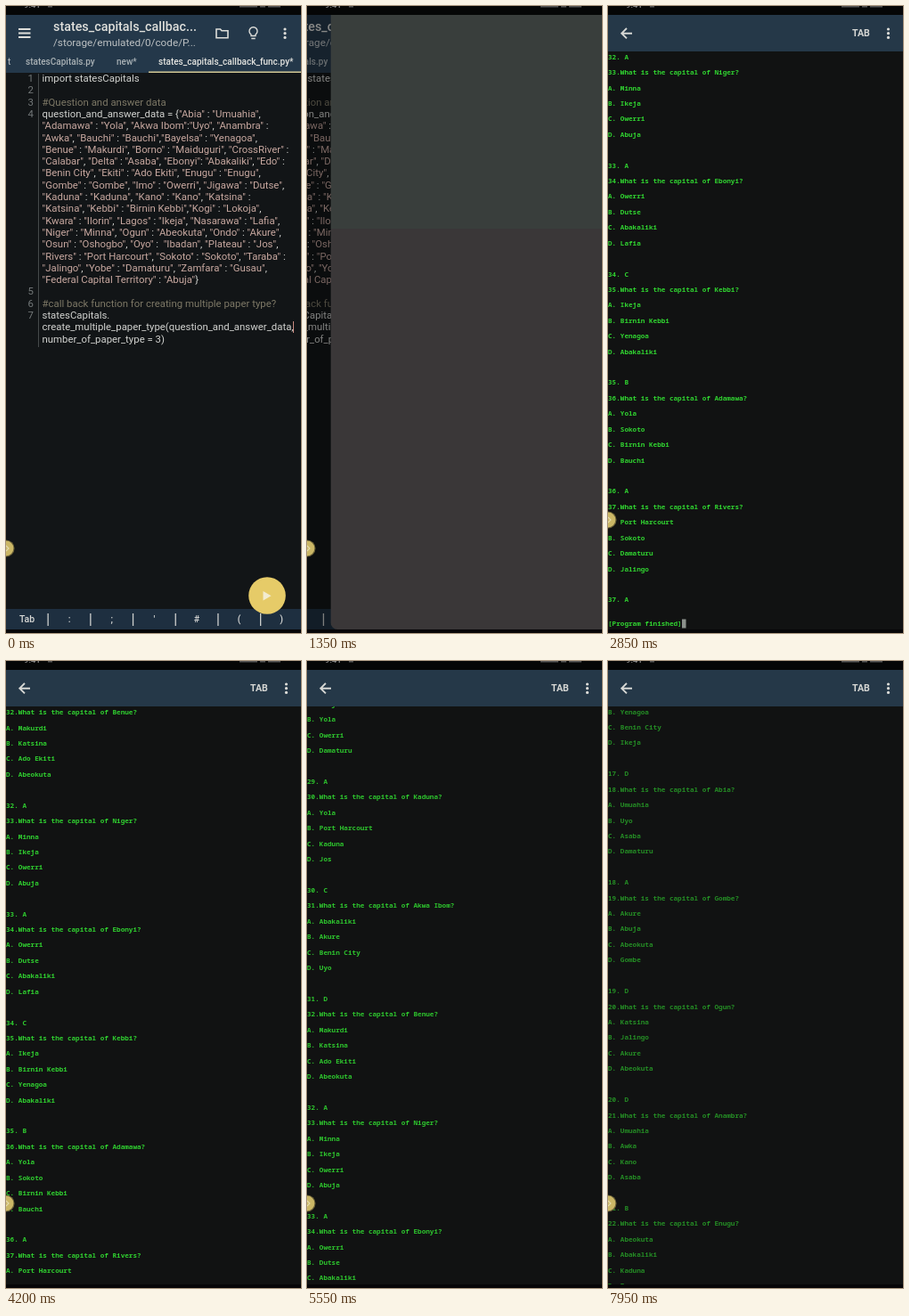
An HTML page with a canvas for the animation above (8 s loop, 331 by 704 pixels).

```html
<!DOCTYPE html>
<html>
<head>
<meta charset="utf-8">
<style>
html, body { margin: 0; width: 100%; height: 100%; overflow: hidden; background: #000; }
canvas { display: block; width: 331px; height: 704px; }
</style>
</head>
<body>
<canvas id="stage" width="331" height="704"></canvas>
<script>
const ctx = document.getElementById('stage').getContext('2d');
const W = 331, H = 704, LOOP = 8000, STEP = 150;
const ROW = 17.42, BLOCK = ROW * 7;
const SANS = 'Roboto, sans-serif', MONO = '"Noto Sans Mono", monospace';

// A leading number starts a numbered line; the rest are wrapped lines.
const code = `1|import statesCapitals
2|
3|#Question and answer data
4|question_and_answer_data = {"Abia" : "Umuahia",
|"Adamawa" : "Yola", "Akwa Ibom":"Uyo", "Anambra" :
|"Awka", "Bauchi" : "Bauchi","Bayelsa" : "Yenagoa",
|"Benue" : "Makurdi", "Borno" : "Maiduguri", "CrossRiver" :
|"Calabar", "Delta" : "Asaba", "Ebonyi": "Abakaliki", "Edo" :
|"Benin City", "Ekiti" : "Ado Ekiti", "Enugu" : "Enugu",
|"Gombe" : "Gombe", "Imo" : "Owerri", "Jigawa" : "Dutse",
|"Kaduna" : "Kaduna", "Kano" : "Kano", "Katsina" :
|"Katsina", "Kebbi" : "Birnin Kebbi","Kogi" : "Lokoja",
|"Kwara" : "Ilorin", "Lagos" : "Ikeja", "Nasarawa" : "Lafia",
|"Niger" : "Minna", "Ogun" : "Abeokuta", "Ondo" : "Akure",
|"Osun" : "Oshogbo", "Oyo" :  "Ibadan", "Plateau" : "Jos",
|"Rivers" : "Port Harcourt", "Sokoto" : "Sokoto", "Taraba" :
|"Jalingo", "Yobe" : "Damaturu", "Zamfara" : "Gusau",
|"Federal Capital Territory" : "Abuja"}
5|
6|#call back function for creating multiple paper type?
7|statesCapitals.
|create_multiple_paper_type(question_and_answer_data,
|number_of_paper_type = 3)`.split('\n').map(l => l.split('|'));

const capitals = {};
for (const m of code.map(l => l[1]).join(' ').matchAll(/"([^"]+)"\s*:\s*"([^"]+)"/g)) capitals[m[1]] = m[2];
const states = Object.keys(capitals);

// Questions of the last paper are 1..37, those of the paper before -36..0.
const quiz = {};
function ask(first, list) {
  list.split('\n').forEach((l, i) => {
    const [state, options] = l.split(': ');
    quiz[first + i] = { state, options: options.split(', ') };
  });
}
ask(-20, `Lagos: Jos, Yenagoa, Benin City, Ikeja
Abia: Umuahia, Uyo, Asaba, Damaturu
Gombe: Akure, Abuja, Abeokuta, Gombe
Ogun: Katsina, Jalingo, Akure, Abeokuta
Anambra: Umuahia, Awka, Kano, Asaba
Enugu: Abeokuta, Abakaliki, Kaduna, Enugu`);
ask(17, `Osun: Jos, Kano, Oshogbo, Makurdi
Jigawa: Lafia, Akure, Dutse, Abeokuta
Gombe: Gombe, Calabar, Akure, Jos
Ogun: Damaturu, Abeokuta, Akure, Umuahia
Anambra: Abuja, Awka, Gusau, Abakaliki
Yobe: Kaduna, Umuahia, Damaturu, Abeokuta`);
ask(29, `Lagos: Ikeja, Yola, Owerri, Damaturu
Kaduna: Yola, Port Harcourt, Kaduna, Jos
Akwa Ibom: Abakaliki, Akure, Benin City, Uyo
Benue: Makurdi, Katsina, Ado Ekiti, Abeokuta
Niger: Minna, Ikeja, Owerri, Abuja
Ebonyi: Owerri, Dutse, Abakaliki, Lafia
Kebbi: Ikeja, Birnin Kebbi, Yenagoa, Abakaliki
Adamawa: Yola, Sokoto, Birnin Kebbi, Bauchi
Rivers: Port Harcourt, Sokoto, Damaturu, Jalingo`);
for (let n = -36; n <= 37; n++) {
  const k = n + 36, pick = i => states[(k * 11 + i * 5) % states.length];
  quiz[n] ??= { state: pick(0), options: [0, 1, 2, 3].map(i => capitals[pick((i + k * 3) % 4)]) };
}

function rect(x, y, w, h, color) {
  ctx.fillStyle = color;
  ctx.fillRect(x, y, w, h);
}
function disc(x, y, r, color) {
  ctx.fillStyle = color;
  ctx.beginPath();
  ctx.arc(x, y, r, 0, 7);
  ctx.fill();
}
function stroke(path, color, width) {
  ctx.strokeStyle = color;
  ctx.lineWidth = width;
  ctx.stroke(new Path2D(path));
}
function text(s, x, y, font, color, align = 'left') {
  ctx.font = font;
  ctx.fillStyle = color;
  ctx.textAlign = align;
  ctx.fillText(s, x, y);
  return ctx.measureText(s).width;
}
function menuDots(x) {
  for (const y of [26, 30.7, 35.4]) disc(x, y, 1.6, '#dcdcd8');
}

function editor() {
  rect(0, 10, W, H, '#121517');
  rect(0, 10, W, 65, '#24384a');
  stroke('M14 26h13.5M14 30.5h13.5M14 35h13.5', '#dededa', 2);
  text('states_capitals_callbac...', 53, 24, '500 14.3px ' + SANS, '#e0e0dc');
  text('/storage/emulated/0/code/P...', 53, 41.5, '11.75px ' + SANS, '#bcc0c2');
  stroke('M236 26h4.5l1.5 1.8h7v8h-13z', '#dededa', 1.6);
  stroke('M275 33.5v-1.5a4.5 4.5 0 1 1 5 0v1.5zM275.3 36.5h4.4', '#dededa', 1.4);
  menuDots(313);
  const tab = '500 10px ' + SANS;
  text('t', 2, 63.5, tab, '#a5adb2');
  text('statesCapitals.py', 22, 63.5, tab, '#a9b1b5');
  text('new*', 124, 63.5, tab, '#a9b1b5');
  text('states_capitals_callback_func.py*', 171, 63.5, tab, '#e4e4e0');
  rect(160, 73.5, 171, 1.5, '#d2c794');

  rect(36, 76, 1, 307, '#45494a');
  const font = '11.4px ' + SANS;
  code.forEach(([num, line], i) => {
    const y = 81.7 + i * 13.3;
    text(num, 31, y, font, '#74797a', 'right');
    let x = 40.5;
    for (const part of line.split(/("[^"]*")/)) {
      const color = part[0] === '#' ? '#7d7866' : part[0] === '"' ? '#c8a8a0' : '#d2d3d0';
      x += text(part, x, y, font, color);
    }
  });
  rect(322, 354, 1, 13, '#c98a80');

  rect(0, 677, W, 23, '#1e2f40');
  const keys = ['Tab', ':', ';', "'", '#', '(', ')'];
  keys.forEach((key, i) => {
    text(key, 23.5 + i * 47.6, 689, '500 10.5px ' + SANS, '#d8d9d6', 'center');
    if (i < 6) rect(46.5 + i * 47.7, 682, 1.3, 14, '#cdcfcd');
  });
  disc(293, 662, 20.8, '#e6cb68');
  ctx.fillStyle = '#f3ecd0';
  ctx.fill(new Path2D('M288.5 657v10.5l9-5.2z'));
}

function terminal(scroll, dim, ready) {
  rect(0, 10, W, H, '#111212');
  if (ready) {
    ctx.globalAlpha = dim;
    const put = (s, y) => text(s, 0, y, '600 7.66px ' + MONO, '#30d230');
    for (let n = -36; n <= 37; n++) {
      const y = 74.9 + (n - 33) * BLOCK + scroll;
      if (y < -90 || y > 720) continue;
      const { state, options } = quiz[n], num = n > 0 ? n : n + 37;
      put(`${num}.What is the capital of ${state}?`, y);
      options.forEach((o, i) => put(`${'ABCD'[i]}. ${o}`, y + ROW * (i + 1)));
      put(`${num}. ${'ABCD'[options.indexOf(capitals[state])]}`, y + ROW * 6);
    }
    const end = 693.5 + scroll;
    put('[Program finished]', end);
    rect(83, end - 5, 4.5, 10, '#8c918c');
    ctx.globalAlpha = 1;
  }
  rect(0, 10, W, 41, '#253848');
  stroke('M27 30.7H15.5M21 25l-5.7 5.7 5.7 5.7', '#d6d7d4', 1.9);
  text('TAB', 274, 31, '600 10.6px ' + SANS, '#d6d7d4');
  menuDots(314.5);
}

function incoming(x) {
  ctx.save();
  ctx.beginPath();
  ctx.roundRect(x, 10, W, 690, [0, 0, 0, 8]);
  ctx.clip();
  rect(x, 10, W, 240, '#393e3c');
  rect(x, 250, W, 450, '#3a3738');
  ctx.restore();
}

// [time, offset, speed]
const path = [[2850, 0, 0], [4200, 105, .2], [5550, 444.2, .7], [6600, 1872.5, 2], [7950, 6410.5, 3.4]];
function scrollAt(t) {
  if (t <= path[0][0]) return [0, 0];
  const i = path.findIndex(p => t <= p[0]);
  const [t0, a, va] = path[i - 1], [t1, b, vb] = path[i];
  const d = t1 - t0, u = (t - t0) / d, w = 1 - u;
  const pos = a * (1 + 2 * u) * w * w + va * d * u * w * w + b * u * u * (3 - 2 * u) - vb * d * u * u * w;
  return [pos, va + (vb - va) * u];
}

function draw(t) {
  ctx.textBaseline = 'middle';
  rect(0, 0, W, H, '#000');
  if (t < 1500) {
    const left = t < 1050 ? 1 : ((1500 - t) / 450) ** 2.3;
    ctx.save();
    ctx.translate(-83 * (1 - left), 0);
    editor();
    ctx.restore();
    rect(0, 10, W, H, `rgba(0,0,0,${.42 * (1 - left)})`);
    if (left < 1) incoming(W * left);
  } else {
    const [pos, speed] = scrollAt(t);
    terminal(pos, 1 - .11 * speed, t >= 1800);
  }
  rect(0, 0, W, 10, '#050606');
  rect(0, 700, W, 4, '#070608');
  text('9:41', 20, -.5, '500 9.5px ' + SANS, '#8b8b8b');
  for (const [x, w] of [[47, 5], [262, 20], [285, 6], [294, 14]]) rect(x, 0, w, 1.5, '#555');

  const lift = t >= 1650 && t < 3000 ? 32 : 0;
  disc(0, 609 - lift, 9.6, '#6a6038');
  disc(0, 609 - lift, 8.4, '#cbb766');
  stroke(`M0 ${606 - lift}l3 3-3 3`, '#e6dcae', 1.2);
}

function frame() {
  draw(Math.floor((performance.now() % LOOP) / STEP) * STEP);
  requestAnimationFrame(frame);
}
frame();
</script>
</body>
</html>
```
